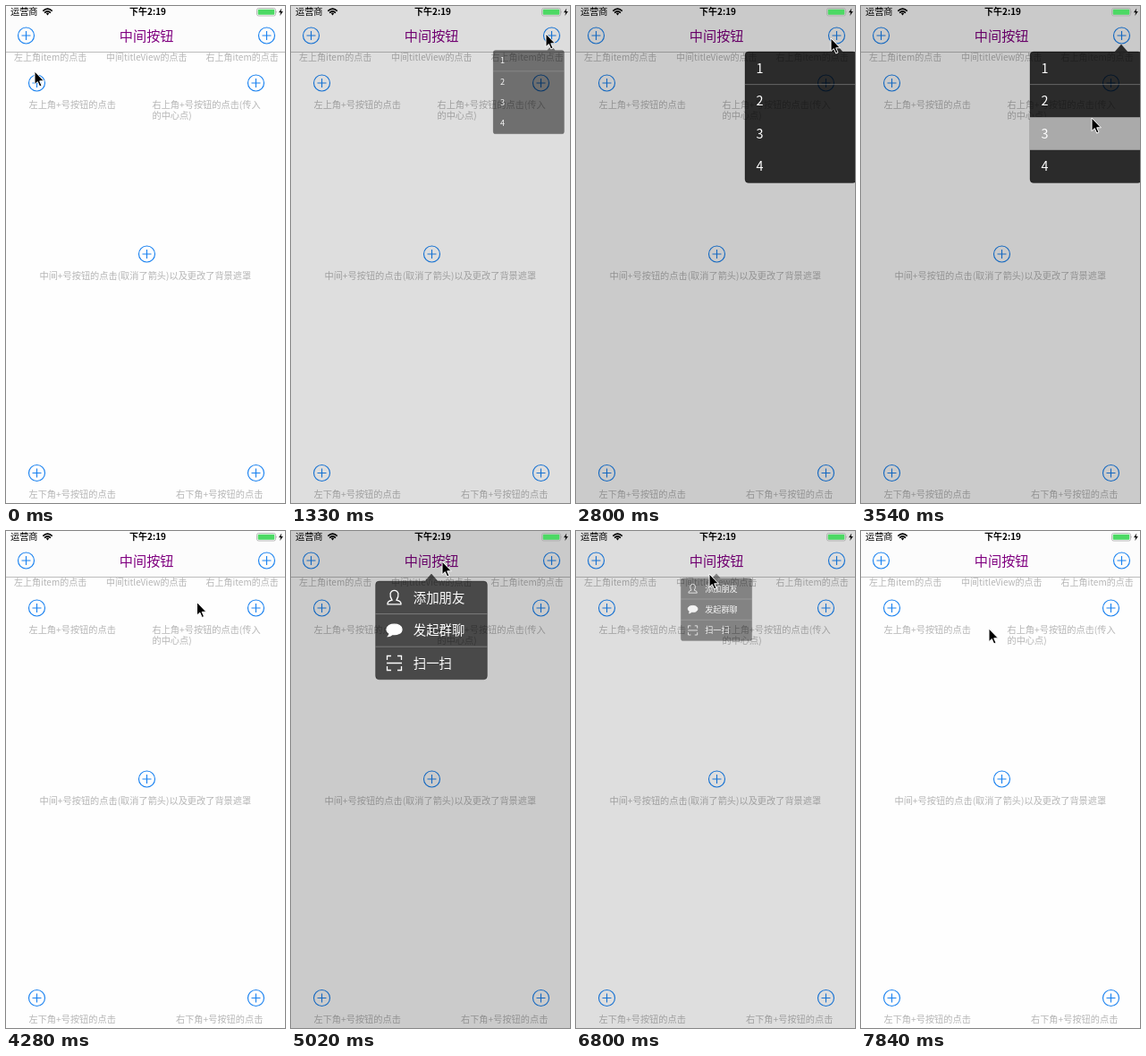
Write an HTML page that moves like this. It is 312 px wide and 555 px high and loops after 7990 ms.

```html
<!DOCTYPE html>
<html lang="zh-CN">
<head>
<meta charset="utf-8">
<style>
html, body { margin: 0; height: 100%; overflow: hidden; background: #fefefe; }
svg { display: block; width: 100%; height: 100%; }
text { font-family: "Noto Sans CJK SC", "Noto Sans CJK", "Noto Sans", sans-serif; white-space: pre; }
.label { fill: #b5b5b5; font-weight: 300; }
.plus { fill: none; stroke: #1a82f0; stroke-width: 1.15; }
.menu text { fill: #fff; font-size: 14.4px; }
.menu .icon { fill: none; stroke: #fff; stroke-width: 1.3; }
.menu .line { stroke: #fff; stroke-opacity: .35; stroke-width: .8; }
</style>
</head>
<body>
<svg viewBox="0 0 312 555">
  <rect width="312" height="51" fill="#fcfcfc"/>
  <rect y="51" width="312" height="1" fill="#bcbcbc"/>
  <text x="126.8" y="38.8" font-size="15.2" fill="#800080">中间按钮</text>
  <g id="page"></g>
  <rect id="dim" width="312" height="555"/>
  <g id="status">
    <text x="5" y="10.3" font-size="10.2">运营商</text>
    <text x="138" y="10.3" font-size="10" font-weight="700">下午2:19</text>
    <path d="M41.3 5.6Q46.5 .8 51.7 5.6M43.1 7.6Q46.5 4.4 49.9 7.6" fill="none" stroke="#000" stroke-width="1.7"/>
    <path d="M44.8 8.2L46.5 10.4L48.2 8.2Q46.5 7 44.8 8.2Z"/>
    <rect x="280.5" y="2.5" width="21" height="8.5" rx="2" fill="none" stroke="#aaa" stroke-width=".8"/>
    <rect x="281.7" y="3.7" width="18.6" height="6.1" rx="1" fill="#4cd964"/>
    <path d="M302.4 5.3q1.4 1.4 0 2.8z" fill="#aaa"/>
    <path d="M308.3 2.4L305 7.2H307.2L306.3 11L309.8 5.9H307.5Z"/>
  </g>
  <g id="right" class="menu"></g>
  <g id="middle" class="menu"></g>
  <path id="cursor" d="M0 0V14.6L3.3 11.6L5.7 17L8 16L5.7 10.8H10.4Z" stroke="#fff" stroke-linejoin="round"/>
</svg>
<script>
const $ = id => document.getElementById(id);
const LOOP = 7990, STEPS = 54;      // the picture changes in steps of about 148 ms
const FADE = 250 / (LOOP / STEPS);  // menu animation, in steps
const ROW = 36.6, WIDTH = 124.8;
const NAV = 33, TOP = 86, CENTRE = 277, BOTTOM = 521.5;

// Every caption hangs below its plus button; the title has a caption only.
function spot(x, y, left, ...lines) {
  const size = y == NAV ? 10 : 10.2;
  const plus = x && `<path class="plus" d="M${x - 9} ${y}a9 9 0 0 1 18 0a9 9 0 0 1 -18 0M${x - 5} ${y}h10M${x} ${y - 5}v10"/>`;
  $('page').innerHTML += (plus || '') + lines.map((s, i) =>
    `<text class="label" x="${left}" y="${y + 27.8 + i * 11.7}" font-size="${size}">${s}</text>`).join('');
}
spot(22.5, NAV, 9, '左上角item的点击');
spot(0, NAV, 112, '中间titleView的点击');
spot(291.5, NAV, 223.5, '右上角item的点击');
spot(34.5, TOP, 25.5, '左上角+号按钮的点击');
spot(279.5, TOP, 163.5, '右上角+号按钮的点击(传入', '的中心点)');
spot(157.5, CENTRE, 37.5, '中间+号按钮的点击(取消了箭头)以及更改了背景遮罩');
spot(34.5, BOTTOM, 25.5, '左下角+号按钮的点击');
spot(279.5, BOTTOM, 190, '右下角+号按钮的点击');

const person = 'M-7.5 7.5Q-8 4 -2.5 2.8Q-5 -1 -4.4 -4.5Q-3.4 -8 0 -8T4.4 -4.5Q5 -1 2.5 2.8Q8 4 7.5 7.5Z';
const bubble = 'M-8.5 -1.2C-8.5 -8.6 8.5 -8.6 8.5 -1.2C8.5 4 2 5.2 -2 4.4Q-4 6.6 -6.8 6.6Q-5.2 5 -5.6 3.2Q-8.5 1.6 -8.5 -1.2Z';
const scan = 'M-8 -3.5V-8H-3.5M3.5 -8H8V-3.5M8 3.5V8H3.5M-3.5 8H-8V3.5M-8.5 0H8.5';

// Menus are drawn around the point from which they grow.
// Visits: [opened, closed, row picked], in steps.
const menus = [
  { id: 'right', x: 291, left: -102, top: 4, alpha: .79, items: [1, 2, 3, 4], textX: -89.5, icons: [],
    pick: 2, pickFill: '#aaa', lines: 1, visits: [[8, 14.4], [16, 24.1, true]] },
  { id: 'middle', x: 157, left: -WIDTH / 2, top: 9, alpha: .64, items: ['添加朋友', '发起群聊', '扫一扫'], textX: -20.2,
    icons: [person, bubble, scan], pick: 0, pickFill: 'rgba(255,255,255,.38)', lines: 2,
    visits: [[32, 41.24, true], [45, 51.24]] }
];

function buildMenu({ id, left, top, alpha, items, textX, icons, pick, pickFill, lines }) {
  const rowY = i => top + i * ROW;
  const bottom = rowY(items.length), right = left + WIDTH;
  let out = `<path fill-opacity="${alpha}" stroke="#000" stroke-opacity=".3" d="M${left + 4} ${top}H-7L0 ${top - 8}L7 ${top}
    H${right - 4}q4 0 4 4V${bottom - 4}q0 4 -4 4H${left + 4}q-4 0 -4 -4V${top + 4}q0 -4 4 -4z"/>
    <rect class="pick" x="${left}" y="${rowY(pick)}" width="${WIDTH}" height="${ROW}" fill="${pickFill}"/>`;
  items.forEach((s, i) => {
    const mid = rowY(i) + ROW / 2;
    out += `<text x="${textX}" y="${mid + 5.2}">${s}</text>`;
    if (icons[i]) out += `<path class="icon" transform="translate(-41.5 ${mid})" d="${icons[i]}"
      ${icons[i] == bubble ? 'style="fill:#fff"' : ''}/>`;
    if (i < lines) out += `<path class="line" d="M${left} ${rowY(i + 1)}h${WIDTH}"/>`;
  });
  $(id).innerHTML = out;
}
menus.forEach(buildMenu);

// Moves of the pointer: [first step, last step, x, y]
const home = [32, 73];
const moves = [[0, 8, 285, 31], [11, 12, 285, 36], [19, 23, 258, 125], [27, 31, 169, 34], [36, 39, 151, 64],
  [42, 44, 149, 48], [46, 49, 143, 109]];

const smooth = x => (x = Math.min(1, Math.max(0, x)), x * x * (3 - 2 * x));

function pointer(step) {
  return moves.reduce(([x, y], [a, b, toX, toY]) => {
    const f = smooth((step - a) / (b - a));
    return [x + (toX - x) * f, y + (toY - y) * f];
  }, home);
}

function drawMenu({ id, x, visits }, step) {
  let size = 0, picked = false;
  for (const [open, close, picks] of visits) {
    size += smooth((step - open) / FADE) - smooth((step - close) / FADE);
    picked ||= picks && step > close - .15 && step < close + FADE;
  }
  const g = $(id);
  g.setAttribute('transform', `translate(${x} 47) scale(${size})`);
  g.setAttribute('opacity', size);
  g.querySelector('.pick').setAttribute('opacity', picked ? 1 : 0);
  return size;
}

const start = performance.now();
function draw(now) {
  const t = Math.max(0, now - start) % LOOP;
  const step = Math.min(STEPS - 1, Math.floor(t / LOOP * STEPS + .1));
  const sizes = menus.map(m => drawMenu(m, step));
  $('dim').setAttribute('opacity', .2 * Math.max(...sizes));
  $('cursor').setAttribute('transform', `translate(${pointer(step).join(' ')})`);
  requestAnimationFrame(draw);
}
draw(start);
</script>
</body>
</html>
```
